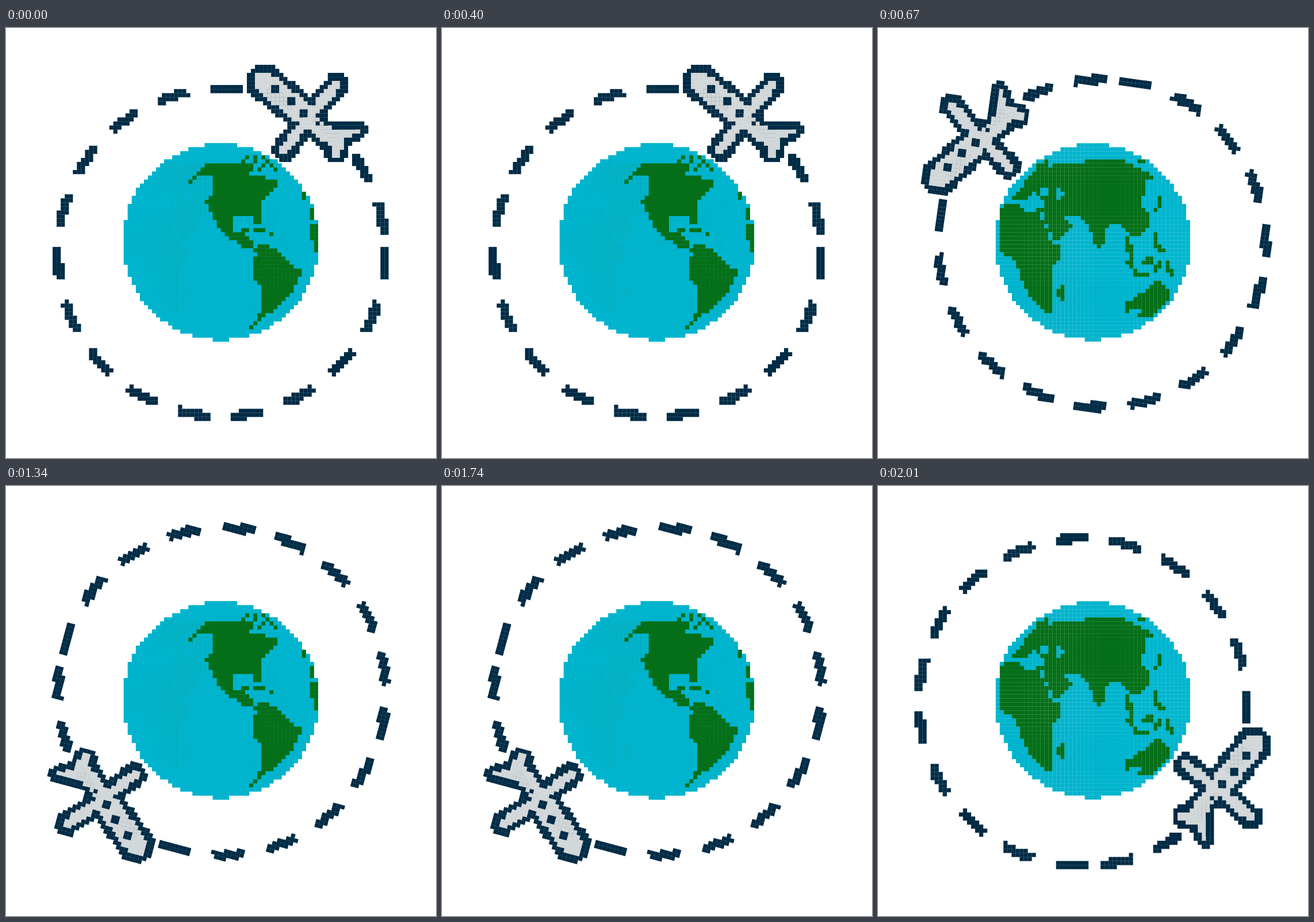
An HTML page with a canvas for the animation above (2680 ms loop, 748 by 748 pixels).

```html
<!DOCTYPE html>
<html lang="en">
<head>
<meta charset="utf-8">
<title>Flight around the globe</title>
<style>
  html, body { margin: 0; width: 100%; height: 100%; overflow: hidden; background: #fff; }
  canvas { display: block; }
</style>
</head>
<body>
<canvas id="stage" width="748" height="748"></canvas>
<script>
const ctx = document.getElementById('stage').getContext('2d');
const CELL = 7.04, OVERLAP = .15;
const NAVY = '#002b45', SILVER = '#d1d6d8', OCEAN = '#00b4ce', LAND = '#046f18';
const STEP = 670;
const TURNS = [0, -82, -165, -270];
const PIVOT = { x: 373, y: 374 };

// Turns smooth shapes into cells; later shapes repaint earlier ones.
class Sprite {
  constructor(x, y) {
    this.x = x;
    this.y = y;
    this.cells = new Map();
  }
  where(test, color, left = 0, top = 0, right = 50, bottom = 50) {
    for (let v = top; v < bottom; v++)
      for (let u = left; u < right; u++)
        if (test(u + .51, v + .49)) this.cells.set(u + ',' + v, { u, v, color });
    return this;
  }
  fill(outline, color) {
    const path = new Path2D(outline);
    return this.where((u, v) => ctx.isPointInPath(path, u, v), color);
  }
  stroke(line, color, width = 1.2, cap = 'butt') {
    const path = new Path2D(line);
    ctx.lineWidth = width;
    ctx.lineCap = cap;
    ctx.lineJoin = 'round';
    return this.where((u, v) => ctx.isPointInStroke(path, u, v), color);
  }
  draw() {
    const size = CELL + OVERLAP;
    for (const { u, v, color } of this.cells.values()) {
      ctx.fillStyle = color;
      ctx.fillRect(this.x + u * CELL, this.y + v * CELL, size, size);
    }
  }
}

const globe = () => new Sprite(204.8, 200.4).where(
  (u, v) => Math.hypot(u - 24, v - 24.35) < 24.2, OCEAN);

const northAmerica = 'M16 10L20 5H32L31.5 7.5L38.5 9.5L34 14.5V20H32V18H27V22H30L32 25V26H30' +
  'L24 22L21 16L20 14.5L22 12V8H19Z';
const southAmerica = 'M31 26L35 25L39 27L41 30L44 31V32.5L42 36L39 39L36 42L33 44L32 46H31L33 43' +
  'L34 41V36L32 33.5V29L33 27Z';
const westAfrica = 'M46 20H48V27H47V24H46Z';
const arctic = 'M29 5L31 3M32.5 3V5M34 3.5L36 4.5M33 7L35 5M36 5L38 7';
const caribbean = 'M29 21.5H31M32 21.5H35M36 22.5H37';
const atlanticCoast = 'M44.5 12V14M46.5 16V19';

const eurasia = 'M15 5H22V4H31L37 7V13H36V15.5L38 17V20L36 22V23H34L31 20H29L27 21L26.3 26H25' +
  'L23 20L20 18H16L19 20L17 23L14.5 24L12 18.5V14.5L9 12L7 14H4L6 11.5L8 8L10.5 6L10 5L13 4V5L14 6Z';
const africa = 'M2 15H6L8 17L12 16V17L11 17.5L14 25H16V28L14 31V42H12L8 37L5 30L4 28L1 27V17Z';
const australia = 'M40 34H41L43 36V38L41 41L38 43H35L37 41H33L32 42V39.5L36 37Z';
const borneo = 'M37 28H39V30H36V29Z';
const innerSeas = 'M11 12H13M15 11.5L16.5 12.5L15 13.5';
const farEast = 'M35 4.5H37M36.5 6.5L38.5 9M40.5 13V15.5L39 17';
const southSeas = 'M39.5 22V25L41.5 27M32.5 23L33.5 29M32.5 29L35 32.5H38M40.5 29L39.5 32M42.5 29L43.5 33';
const madagascar = 'M16.5 35V39M15.5 36V38';

const west = globe()
  .fill(northAmerica, LAND)
  .fill(southAmerica, LAND)
  .fill(westAfrica, LAND)
  .stroke(arctic + caribbean + atlanticCoast, LAND);

const east = globe()
  .fill(eurasia, LAND)
  .fill(africa, LAND)
  .fill(australia, LAND)
  .fill(borneo, LAND)
  .stroke(innerSeas, OCEAN)
  .stroke(farEast + southSeas + madagascar, LAND);

const plane = new Sprite(419, 64);
const fuselage = 'M4.3 4.3L14 12';
const wings = 'M22.2 4.9L15.7 12.5L9.3 21';
const tail = 'M15 11L20 15.5L28.3 16L24.5 18.3L22.7 22.7H21.2V20.8L13 14Z';
for (const [color, border] of [[NAVY, 3.5], [SILVER, .1]]) {
  plane.fill(tail, color)
    .stroke(tail, color, border, 'round')
    .stroke(fuselage, color, 5.4 + border, 'round')
    .stroke(wings, color, 2.4 + border, 'round');
}
for (let i = 0; i < 4; i++) {
  const u = Math.round(6 + 3.5 * i), v = 5 + 3 * i, size = i < 3 ? 2 : 1;
  plane.where(() => true, NAVY, u, v, u + size, v + size);
}

// Dashes run clockwise from the right; the last gap is a little short.
function onDash(u, v) {
  const x = plane.x + u * CELL - 375;
  const y = plane.y + v * CELL - 390.5;
  const period = 19.1, first = 94.2, half = 5.6;
  const angle = Math.atan2(x, -y) * 180 / Math.PI;
  const along = (angle - first + half + 720) % 360;
  return Math.abs(Math.hypot(x, y) - 285) < 8 && along % period < 2 * half && along < 19 * period - 4;
}
const trail = new Sprite(plane.x, plane.y).where(onDash, NAVY, -50, 0, 38, 92);

function draw(index) {
  ctx.fillStyle = '#fff';
  ctx.fillRect(0, 0, 748, 748);
  east.draw();
  if (index % 2 === 0) west.draw();
  ctx.save();
  ctx.translate(PIVOT.x, PIVOT.y);
  ctx.rotate(TURNS[index] * Math.PI / 180);
  ctx.translate(-PIVOT.x, -PIVOT.y);
  trail.draw();
  plane.draw();
  ctx.restore();
}

let start;
function tick(now) {
  start ??= now;
  draw(Math.floor((now - start) / STEP) % TURNS.length);
  requestAnimationFrame(tick);
}
draw(0);
requestAnimationFrame(tick);
</script>
</body>
</html>
```
